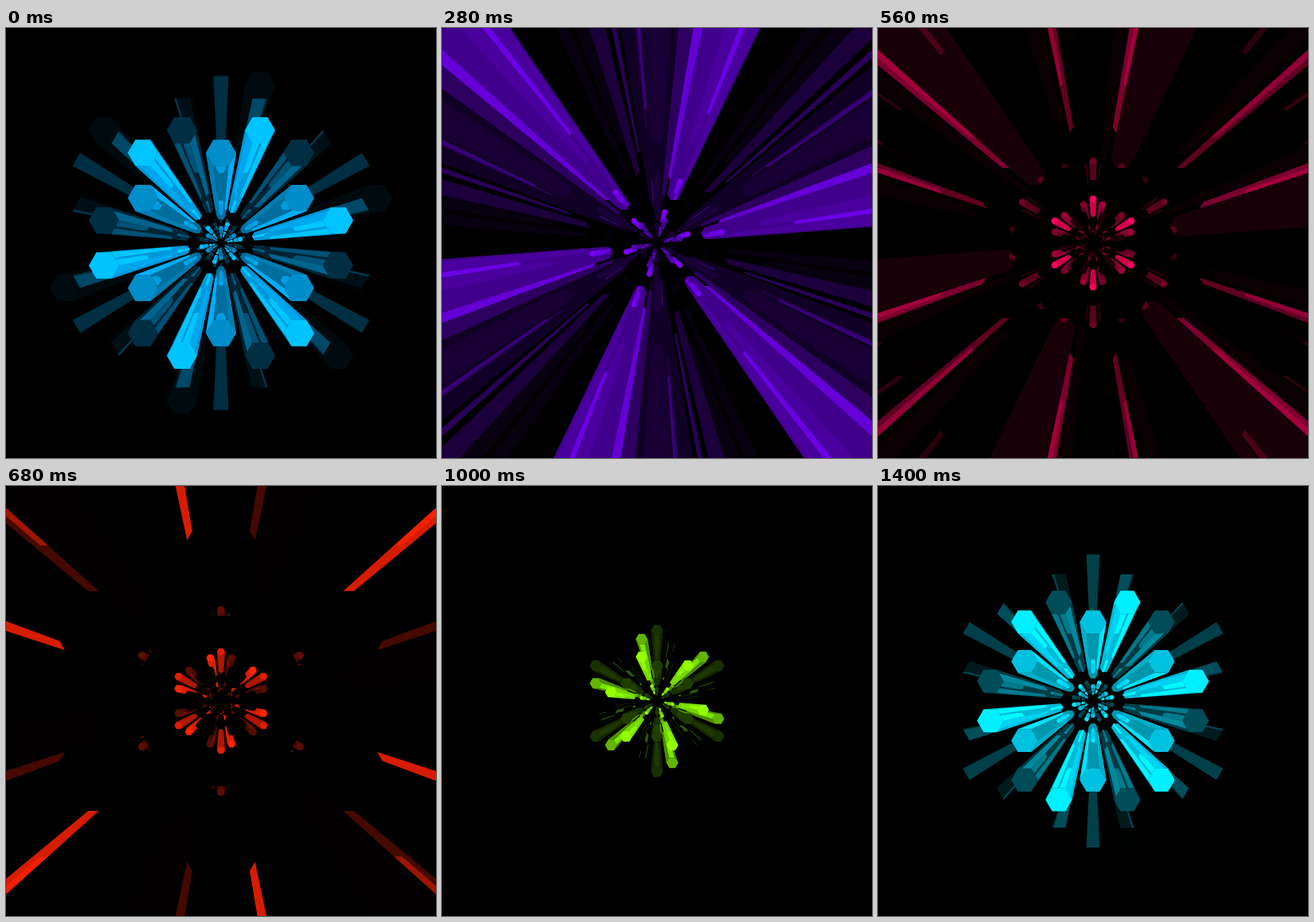
Animation, 540 px wide and 540 px high, one loop 1.44 s. Source, as an HTML page with a canvas:

```html
<!DOCTYPE html>
<html>
<head>
<meta charset="utf-8">
<style>
  html, body { margin: 0; width: 100%; height: 100%; overflow: hidden; background: #000; }
  canvas { display: block; width: 540px; height: 540px; }
</style>
</head>
<body>
<canvas id="c" width="540" height="540"></canvas>
<script>
const ctx = document.getElementById('c').getContext('2d');
const LOOP = 1440, STEP = 40;
const SPEED = 6.2e-5, NEAR = 0.01767, LENGTH = 0.0405, EPS = 0.0005;
const GAP = SPEED * LOOP, LAYERS = 4;
const COL = Math.sqrt(3) / 2, SIXTH = Math.PI / 3, RADIUS = 0.337;
const SIDE = 0.85, CAP = 1.1, MIRROR = 0.42;

// One cell of each sixfold ring, outer first; the beat is its turn to light up.
const RINGS = [
  { at: [0, -4], beat: 2 },
  { at: [COL, -3.5], beat: 1 },
  { at: [-COL, -3.5], beat: 3 },
  { at: [COL, -2.5], beat: 6 },
  { at: [-COL, -2.5], beat: 4 },
  { at: [0, -2], beat: 5 }
];

const sub = (a, b) => [a[0] - b[0], a[1] - b[1]];
const dot = (a, b) => a[0] * b[0] + a[1] * b[1];
const middle = ([a, b]) => [(a[0] + b[0]) / 2, (a[1] + b[1]) / 2];
const scaled = (p, s) => [p[0] * s, p[1] * s];
const turn = ([x, y], a) => [x * Math.cos(a) - y * Math.sin(a), x * Math.sin(a) + y * Math.cos(a)];
const hexAt = ([x, y]) => Array.from({ length: 6 }, (_, k) =>
  [x + RADIUS * Math.cos(k * SIXTH), y + RADIUS * Math.sin(k * SIXTH)]);

// Quick rise, slow fall, once per loop.
function glow(beat, t) {
  const rise = 260, fall = 740;
  const x = (t - beat * LOOP / 6 + 280 + 2 * LOOP) % LOOP - rise;
  const u = x < 0 ? -x / rise : x / fall;
  return u < 1 ? 0.5 + 0.5 * Math.cos(Math.PI * u) : 0;
}

function hueColor(hue) {
  const channel = n => {
    const k = (n + hue / 60) % 6;
    return 255 * (1 - Math.max(0, Math.min(k, 4 - k, 1)));
  };
  return [5, 3, 1].map(channel);
}

function prism(center, hex) {
  const edges = hex.map((a, i) => [a, hex[(i + 1) % 6]]).filter(edge => {
    const mid = middle(edge);
    return dot(sub(mid, center), mid) < 0;
  });
  return { center, hex, edges };
}

function mirror(p, [a, b]) {
  const n = [b[1] - a[1], a[0] - b[0]];
  return sub(p, scaled(n, 2 * dot(sub(p, a), n) / dot(n, n)));
}

// Prisms seen in one side face, farthest first.
function mirrored(edge, own) {
  const mid = middle(edge), normal = sub(mid, own);
  const angle = p => Math.atan2(mid[0] * p[1] - mid[1] * p[0], dot(mid, p));
  const half = Math.abs(angle(edge[0]));
  const found = [];
  for (const ring of RINGS) for (let k = 0; k < 6; k++) {
    const c = turn(ring.at, k * SIXTH);
    if (dot(sub(c, mid), normal) < 0.05) continue;
    const m = mirror(c, edge);
    if (Math.abs(angle(m)) > half + 0.4 / Math.hypot(...m)) continue;
    found.push({ ring, ...prism(m, hexAt(c).map(p => mirror(p, edge))) });
  }
  return found.sort((a, b) => dot(b.center, b.center) - dot(a.center, a.center));
}

for (const ring of RINGS) {
  Object.assign(ring, prism(ring.at, hexAt(ring.at)));
  ring.echo = ring.edges.map(e => mirrored(e, ring.at));
}

let base;
const tint = v => `rgb(${base.map(c => Math.min(255, Math.round(c * v))).join(',')})`;

function poly(points) {
  points.forEach(([x, y], i) => i ? ctx.lineTo(x, y) : ctx.moveTo(x, y));
  ctx.closePath();
}

function sidePath(edges, { near, far }) {
  ctx.beginPath();
  for (const [a, b] of edges)
    poly([scaled(a, near), scaled(b, near), scaled(b, far), scaled(a, far)]);
}

function drawSides(shape, layer, v) {
  sidePath(shape.edges, layer);
  ctx.fillStyle = tint(v);
  ctx.fill();
}

function drawCap(shape, layer, v) {
  if (!layer.open) return;
  ctx.beginPath();
  poly(shape.hex.map(p => scaled(p, layer.near)));
  ctx.fillStyle = tint(v);
  ctx.fill();
}

// Each mirrored colour sits on top of the face's own light.
function drawEcho(ring, layer, behind) {
  const own = ring.light * SIDE;
  ring.edges.forEach((edge, i) => {
    ctx.save();
    sidePath([edge], layer);
    ctx.clip();
    for (const source of [behind, layer]) for (const e of ring.echo[i]) {
      drawSides(e, source, own + e.ring.light * SIDE * MIRROR);
      drawCap(e, source, own + e.ring.light * CAP * MIRROR);
    }
    ctx.restore();
  });
}

function layerAt(j, t) {
  const z = NEAR + j * GAP - SPEED * t;
  return {
    gone: z + LENGTH <= EPS,
    open: z > EPS,
    near: 1 / Math.max(z, EPS),
    far: 1 / Math.max(z + LENGTH, EPS)
  };
}

function draw(t) {
  base = hueColor(198 + 360 * t / LOOP);
  for (const ring of RINGS) ring.light = glow(ring.beat, t);
  ctx.setTransform(1, 0, 0, 1, 0, 0);
  ctx.fillStyle = '#000';
  ctx.fillRect(0, 0, 540, 540);
  ctx.translate(270, 270);
  for (let j = LAYERS - 1; j >= 0; j--) {
    const layer = layerAt(j, t), behind = layerAt(j + 1, t);
    if (layer.gone) continue;
    for (const ring of RINGS) for (let k = 0; k < 6; k++) {
      ctx.save();
      ctx.rotate(k * SIXTH);
      drawSides(ring, layer, ring.light * SIDE);
      if (j < 2) drawEcho(ring, layer, behind);
      drawCap(ring, layer, ring.light * CAP);
      ctx.restore();
    }
  }
}

const start = performance.now();
let last = -1;
function tick() {
  const t = Math.floor((performance.now() - start) % LOOP / STEP) * STEP;
  if (t !== last) draw(last = t);
  requestAnimationFrame(tick);
}
tick();
</script>
</body>
</html>
```
